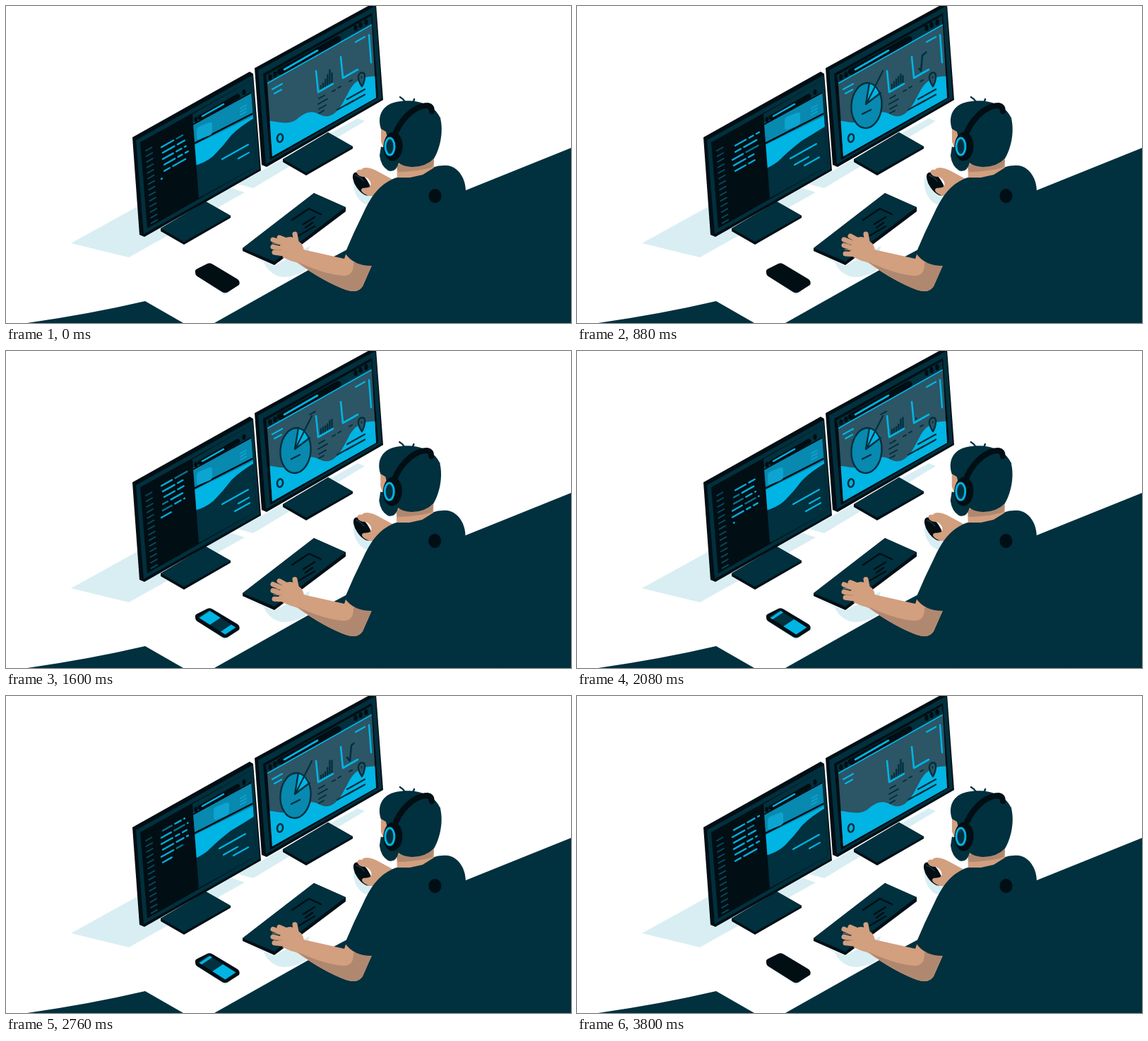
Write an HTML page with a canvas that moves like this. It is 800x449 px and loops after 3.84 s.

```html
<!DOCTYPE html>
<html lang="en">
<head>
<meta charset="utf-8">
<title>Developer at a desk</title>
<style>
html, body { margin: 0; width: 100%; height: 100%; overflow: hidden; background: #fff; }
canvas { display: block; width: 800px; height: 449px; }
</style>
</head>
<body>
<canvas id="stage" width="800" height="449"></canvas>
<script>
const ctx = document.getElementById('stage').getContext('2d');
const LOOP = 3840;
const NAVY = '#01303e', INK = '#010e14', CYAN = '#00b4e4', SLATE = '#2c5565',
  BLUE = '#0889b0', CARD = '#0ca4d0', PALE = '#d8eef3', SKIN = '#d29f7f', TAN = '#b08870', DIM = '#07485c';
const SLOPE = -0.56;

const clamp = x => Math.max(0, Math.min(1, x));
const mix = (a, b, k) => a + (b - a) * k;
// Eased 0..1 progress between two times.
function ramp(t, from, to) {
  const k = clamp((t - from) / (to - from));
  return k * k * (3 - 2 * k);
}
const rand = n => {
  const s = Math.sin(n * 127.1 + 3.7) * 43758.5453;
  return s - Math.floor(s);
};

function fill(d, color) {
  ctx.fillStyle = color;
  ctx.fill(new Path2D(d));
}
function stroke(d, color, width = 2) {
  ctx.strokeStyle = color;
  ctx.lineWidth = width;
  ctx.stroke(new Path2D(d));
}
function oval(x, y, rx, ry, angle, color, width = 0) {
  ctx.beginPath();
  ctx.ellipse(x, y, rx, ry, angle, 0, Math.PI * 2);
  if (width) {
    ctx.strokeStyle = color;
    ctx.lineWidth = width;
    ctx.stroke();
  } else {
    ctx.fillStyle = color;
    ctx.fill();
  }
}
// A bar that follows the tilt of the screens.
const dash = (x, y, len, color, width = 2) =>
  stroke(`M${x} ${y}l${len} ${len * SLOPE}`, color, width);
function group(draw, dx = 0, dy = 0, clip = '') {
  ctx.save();
  ctx.translate(dx, dy);
  if (clip) ctx.clip(new Path2D(clip));
  draw();
  ctx.restore();
}

function desk() {
  fill('M295 449L430 373L500 336L651 261L800 201V449Z', NAVY);
  fill('M30 449Q120 436 197 418L251 449Z', NAVY);
  fill('M92 336L188 283L320 258L338 264L174 356Z', PALE);
  fill('M328 252L350 258L508 163L498 159Z', PALE);
  fill('M330 347L380 368L430 340L424 375Q400 388 384 382Q370 376 365 363Z', PALE);
  fill('M492 243Q490 264 502 276Q512 286 522 277L515 262Z', PALE);
  fill('M267 380L309 409L318 405L275 375Z', PALE);
}

function stand(dx, dy) {
  group(() => {
    fill('M219 315L283 277L318 297V300L252 338L219 319Z', INK);
    fill('M219 315L283 277L318 297L252 334Z', NAVY);
  }, dx, dy);
}

function codeLines(t) {
  for (let i = 0; i < 14; i++) dash(198 + i * 0.6, 205 + i * 7.9, 8.5, DIM);
  const rows = 13;
  const pos = t / LOOP * rows + 0.02;
  const current = Math.floor(pos);
  const phase = pos - current;
  const lift = 9 * ramp(phase, 0, 0.45);
  for (let back = 0; back < 6; back++) {
    const row = (current - back + rows) % rows;
    const y = 245 - back * 9 - lift;
    let x = Math.floor(rand(row) * 3) * 2;
    const reach = back ? 40 : phase * 40;
    const end = 30 + rand(row + 20) * 9;
    for (let j = 0; x < Math.min(end, reach); j++) {
      const len = Math.min(5 + rand(row * 5 + j + 60) * 13, end - x, reach - x);
      const color = rand(row * 7 + j + 90) < 0.2 ? '#08718f' : '#05acda';
      dash(220 + x, y + x * SLOPE, Math.max(len, 0.5), color, 2.4);
      x += len + 4.5;
    }
  }
}

function webPage(t) {
  const p = t % (LOOP / 2);
  const b = ramp(p, 400, 700) - ramp(p, 1150, 1450);
  group(() => {
    fill('M260 90H365V280H260Z', NAVY);
    fill('M260 168L365 112V148L260 200Z', BLUE);
    fill(`M260 200L365 148V${mix(151, 162, b)}
      Q${mix(335, 340, b)} ${mix(167, 178, b)} ${mix(319, 318, b)} ${mix(183, 191, b)}
      Q${mix(307, 300, b)} ${mix(199, 205, b)} ${mix(294, 288, b)} ${mix(212, 217, b)}
      Q282 ${mix(223, 224, b)} 260 ${mix(228, 234, b)}Z`, CYAN);
    stroke('M264 168L350 121', INK, 2);
    stroke('M264 196L350 152', INK, 2.5);
    const cx = mix(281, 305, b), cy = mix(177, 163, b);
    group(() => fill('M-11 0Q-11 -4 -8 -6L7 -12Q11 -13 11 -9V1Q11 4 8 6L-7 12Q-11 13 -11 9Z', CARD), cx, cy);
    for (let i = 0; i < 3; i++) dash(332, 145 + i * 4.5, 8, CARD, 1.8);
    stroke('M275 158L328 128', INK, 7);
    stroke('M278 156L308 139', CYAN, 2.5);
    oval(269, 161, 2.5, 4, 0, INK);
    oval(337, 122, 2.5, 4, 0, INK);
    dash(mix(306, 302, b), mix(217, 216, b), 37, CYAN, 2.2);
    dash(mix(329, 308, b), mix(216, 225, b), mix(15, 20, b), CYAN, 2.2);
    const third = Math.max(b, ramp(t, 1300, 1450) - ramp(t, 3050, 3250));
    if (third > 0.02) dash(mix(324, 322, b), mix(227, 226, b), 21 * third, CYAN, 2.2);
  }, 0, 0, 'M264 153L346 106L355 227L273 272Z');
}

function leftMonitor(t) {
  stand(0, 0);
  fill('M179 186L345 93L350 96L361 233L196 327L189 324Z', INK);
  fill('M184 190L349 98L359 231L195 323Z', NAVY);
  fill('M190 193L346 106L355 227L200 315Z', INK);
  codeLines(t);
  webPage(t);
}

function pie(t) {
  const s = ramp(t, 250, 750) - ramp(t, 3200, 3600);
  if (s > 0.01) {
    group(() => {
      const width = 2.4 / Math.max(s, 0.5);
      const wedge = 'M-1 -2L4 -32Q17 -29 20 -18Z';
      ctx.scale(s, s);
      oval(0, 0, 21.5, 32, 0.08, BLUE);
      fill(wedge, CYAN);
      oval(0, 0, 21.5, 32, 0.08, NAVY, width);
      stroke('M20 -18L-1 -2L4 -32M-6 12L6 6', NAVY, width);
    }, 410, 141);
  }
  const line = ramp(t, 650, 850) - ramp(t, 3000, 3200);
  if (line > 0.01) stroke(`M410 138l${23 * line} ${-46 * line}`, NAVY, 2.2);
  const tip = ramp(t, 950, 1100) - ramp(t, 2550, 2720);
  if (tip > 0.01) dash(430, 90, 8 * tip, NAVY);
}

function trendLine(t) {
  const p = t % (LOOP / 2);
  const head = ramp(p, 110, 1100), tail = ramp(p, 450, 1750);
  if (head - tail < 0.005) return;
  const length = 54;
  ctx.setLineDash([(head - tail) * length, 200]);
  ctx.lineDashOffset = -tail * length;
  stroke('M480 96L482 86L487 92L489 70L496 64', NAVY, 2.5);
  ctx.setLineDash([]);
}

function dashboard(t) {
  fill('M368 98L517 14L518 29L370 112Z', NAVY);
  group(() => {
    fill('M365 20H530V220H365Z', SLATE);
    fill('M365 162C386 163 397 170 411 161C425 149 433 147 447 155C465 161 474 143 484 124C493 105 506 97 530 100V220H365Z', CYAN);
    pie(t);
    dash(377, 118, 14, CYAN, 2.3);
    dash(380, 124, 10, CYAN, 2.3);
    dash(495, 51, 13, CYAN, 2.3);
    stroke('M514 41L517 80M439 92L442 122L463 110M474 72L477 102L498 90', CYAN, 2.6);
    for (let i = 0; i < 6; i++) {
      const wave = Math.sin(t / LOOP * Math.PI * 2 - 0.9 + i * 0.8);
      const height = [5, 6, 8, 11, 16, 13][i] * (1 + 0.3 * wave);
      const x = 446 + i * 3.1;
      stroke(`M${x} ${117 - i * 1.75}v${-height}`, NAVY, 2.3);
    }
    trendLine(t);
    [[443, 131, 8], [442, 139, 13], [443, 146, 10], [443, 152, 7],
      [462, 121, 4], [470, 116, 4], [486, 107, 4]].forEach(d => dash(...d, NAVY));
    [[483, 132, 25], [469, 147, 23], [482, 140, 26]].forEach(d => dash(...d, NAVY, 2.2));
    const pin = 'M504 114C500 108 498 104 499 99C501 93 508 93 508 99C508 104 507 109 504 114Z';
    fill(pin, SLATE);
    stroke(pin, NAVY, 2.4);
    oval(503.5, 101, 1, 2, 0, NAVY);
    oval(388, 187, 4, 5.8, 0.15, NAVY, 2.6);
  }, 0, 0, 'M370 110L518 27L524 130L377 213Z');
  stroke('M371 109L517 27', CYAN, 2);
  stroke('M388 93L470 47', INK, 9);
  stroke('M394 90L441 63', CYAN, 2.6);
  [[374, 101], [381, 97], [495, 31], [502, 27], [510, 23]]
    .forEach(([x, y]) => oval(x, y, 2.7, 4.3, 0, INK));
}

function rightMonitor(t) {
  stand(173, -98);
  fill('M352 88L520 -4L524 -2L534 133L369 228L362 225Z', INK);
  fill('M357 91L523 0L532 131L368 224Z', NAVY);
  fill('M364 96L518 10L527 130L374 218Z', INK);
  dashboard(t);
}

function keyboard() {
  fill('M335 343L436 265L481 285V291L380 367L335 347Z', INK);
  fill('M335 343L436 265L481 285L380 362Z', NAVY);
  stroke('M405 303L429 287L446 295M421 309L437 299M424 314L434 307M415 325L437 312', INK, 2.4);
}

function phone(t) {
  fill('M268 377Q267 374 271 372L285 365Q289 363 293 366L328 387Q332 390 330 395L316 404Q311 408 306 405L271 383Q268 381 268 377Z', INK);
  if (t < 1280 || t >= 3600) return;
  const at = (u, v) => `${272 + 39 * u + 15 * v} ${377 + 25 * u - 10 * v}`;
  const block = (a, b, color) =>
    fill(`M${at(a, 0)}L${at(b, 0)}L${at(b, 1)}L${at(a, 1)}Z`, color);
  const scroll = 0.3 * ramp(t, 1600, 2040);
  block(0, 1, NAVY);
  block(0.04, 0.43 - scroll, CYAN);
  block(0.82 - scroll, 0.98, CYAN);
}

function mouseHand(t) {
  const shift = 4 * (ramp(t, 400, 800) - ramp(t, 1000, 1400)) + ramp(t, 1400, 1600) - ramp(t, 3000, 3300);
  group(() => {
    oval(504, 252, 9, 19, -0.6, INK);
    stroke('M495 240Q502 242 506 248', SLATE, 1);
    fill('M497 237C495 233 499 231 503 232C506 227 515 229 524 233L548 246L522 269C513 271 502 264 503 260C505 256 510 259 515 256C519 251 514 244 508 242Q499 242 497 237Z', SKIN);
  }, shift);
}

function typingHand(t) {
  const tap = n => 1.2 * Math.sin(t / LOOP * Math.PI * 2 * 11 + n);
  fill('M405 340L421 345L479 358L483 346L520 363L505 397Q498 408 481 402Q449 390 413 364L391 356Z', SKIN);
  fill('M412 362Q450 380 477 382Q493 383 492 363L519 365L505 397Q498 408 481 402Q449 390 412 362Z', TAN);
  fill('M389 335Q397 324 407 328L418 336Q425 346 420 356Q411 366 399 359L386 350Z', SKIN);
  stroke(`M378 ${331 + tap(0)}L399 339M378 ${340 + tap(2)}L398 346M380 ${350 + tap(4)}L401 352`, SKIN, 7);
  stroke(`M387 ${327 + tap(1)}L402 334M409 ${323 + tap(3)}L413 344`, SKIN, 7);
  stroke('M377 336L389 338M379 345L390 346', TAN, 1);
}

function head() {
  fill('M553 222L606 216L606 229L590 239L572 243L554 243Z', SKIN);
  fill('M553 225L606 218L604 228Q588 234 555 235Z', TAN);
  fill('M531 173L545 171L545 209L532 207L534 200L531 192Z', SKIN);
  fill('M531 174C525 156 533 140 552 136C582 130 608 141 615 159C620 179 614 203 606 216Q594 228 575 228Q561 227 556 222Q552 237 541 233Q531 227 529 212L531 199Q537 204 540 186L538 178Z', NAVY);
  stroke('M558 129Q562 131 565 136M572 137Q578 136 578 132M606 159Q611 156 614 159', NAVY, 2.5);
  stroke('M549 187C556 164 576 141 597 141Q603 142 603 149', INK, 8);
  oval(548, 199, 13.5, 20.5, 0.05, INK);
  oval(543.5, 199, 6.5, 12, 0, NAVY);
  oval(543.5, 199, 6.5, 12, 0, CYAN, 3);
}

function person(t) {
  const sway = -0.5 + 0.5 * Math.cos(t / LOOP * Math.PI * 8);
  typingHand(t);
  mouseHand(t);
  group(() => {
    fill('M553 243C530 251 518 268 507 291Q492 321 480 350Q492 368 518 368L535 449H700L651 262C651 246 642 229 626 226Q614 225 603 229Q590 241 553 243Z', NAVY);
    oval(607.5, 269, 9, 10, 0, INK);
  }, sway * 0.6);
  group(head, sway);
}

function render(t) {
  ctx.fillStyle = '#fff';
  ctx.fillRect(0, 0, 800, 449);
  ctx.lineCap = ctx.lineJoin = 'round';
  desk();
  leftMonitor(t);
  rightMonitor(t);
  keyboard();
  phone(t);
  person(t);
}

const start = performance.now();
function tick() {
  render((performance.now() - start) % LOOP);
  requestAnimationFrame(tick);
}
tick();
</script>
</body>
</html>
```
